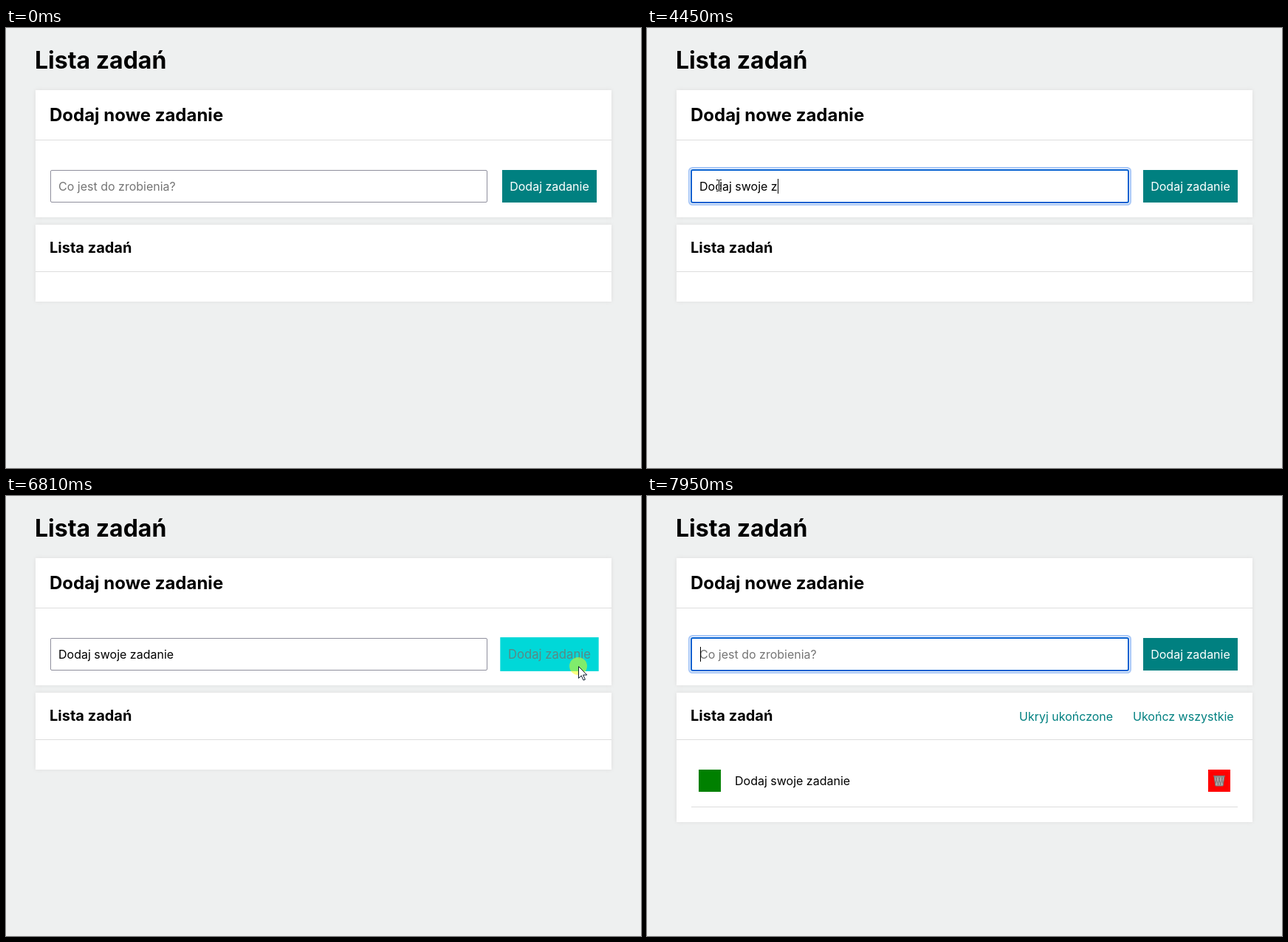
An HTML page that plays this animation: 860 by 595 pixels, repeating every 8 s.

```html
<!DOCTYPE html>
<html lang="pl">
<head>
<meta charset="utf-8">
<title>Lista zadań</title>
<style>
html, body { margin: 0; width: 100%; height: 100%; overflow: hidden; background: #eef0f0; }
body { font: 16px/20px Inter, sans-serif; font-optical-sizing: none; color: #000; }
body * { position: absolute; left: 0; top: 0; box-sizing: border-box; margin: 0; white-space: pre; }
section { left: 40px; width: 780px; background: #fff; box-shadow: 0 0 5px #ddd; }
h1 { left: 39px; top: 24px; font-size: 32px; line-height: 39px; }
h2 { width: 780px; padding-left: 19px; border-bottom: 1px solid #ddd; }
#form { top: 84px; height: 172px; }
#form h2 { font-size: 24px; line-height: 67px; height: 68px; }
#list { top: 266px; height: 104px; }
#list h2 { font-size: 20px; line-height: 63px; height: 64px; }
#field { left: 60px; top: 192px; width: 592px; height: 44px; border: 1px solid #8f8f9d; border-radius: 2px; background: #fff; }
#field.focus { border-color: #0560d0; box-shadow: 0 0 0 1px #0560d0, 0 0 0 2px #fff, 0 0 0 4px #a9c8f7; }
#text { left: 71px; top: 204px; }
#caret { top: 204px; width: 1px; height: 20px; background: #000; }
#button { left: 672px; top: 192px; width: 128px; height: 44px; line-height: 44px; text-align: center; }
.link { top: 22px; color: teal; }
.box { top: 104px; width: 30px; height: 30px; }
#line { left: 20px; top: 154px; width: 740px; height: 1px; background: #ddd; }
</style>
</head>
<body>
<h1>Lista zadań</h1>
<section id="form"><h2>Dodaj nowe zadanie</h2></section>
<section id="list">
  <h2>Lista zadań</h2>
  <div id="item">
    <span class="link" style="left:464px">Ukryj ukończone</span>
    <span class="link" style="left:618px">Ukończ wszystkie</span>
    <div class="box" style="left:30px;background:green"></div>
    <span style="left:79px;top:109px">Dodaj swoje zadanie</span>
    <div class="box" style="left:720px;background:red">
      <svg width="30" height="30" fill="none" stroke="#777">
        <path d="M8 9h14l-2 13h-10z" fill="#b5aaaa"/>
        <path d="M7 8.5h16M10 10l4 11M14 10l3 11M18 10l2 9M20 10l-4 11M16 10l-3 11M12 10l-2 9"/>
      </svg>
    </div>
    <div id="line"></div>
  </div>
</section>
<div id="field"></div>
<span id="text"></span>
<div id="caret"></div>
<div id="button">Dodaj zadanie</div>
<svg width="860" height="595">
  <g id="pointer">
    <circle id="press" r="12" fill="#ff0" opacity=".5"/>
    <path id="arrow" d="M.5.5v16l3.7-3.6 2.8 6.2 2.4-1-2.8-6.1h5.2z" fill="#fff" stroke="#0b1a2c"/>
    <g id="beam" fill="none">
      <path d="M-3-7.5h3M1-7.5h3M.5-7v14M-3 7.5h3M1 7.5h3" stroke="#fff" stroke-width="2.5"/>
      <path d="M-3-7.5h3M1-7.5h3M.5-7v14M-3 7.5h3M1 7.5h3" stroke="#000"/>
    </g>
  </g>
</svg>
<script>
const $ = id => document.getElementById(id);
const LOOP = 8000, FOCUS = 800, PRESS = 6740, ADDED = 6880;

// Bursts of typing: start time and letters, one every KEY_GAP ms.
const KEY_GAP = 82;
const bursts = [[1800, 'Do'], [2190, 'da'], [2720, 'j '], [3130, 'swo'],
  [3590, 'je '], [4450, 'z'], [4720, 'a'], [4930, 'danie']];
const keys = bursts.flatMap(([start, letters]) =>
  [...letters].map((letter, i) => ({ letter, time: start + i * KEY_GAP })));

const span = (t, a, b) => Math.min(1, Math.max(0, (t - a) / (b - a)));
const mix = (a, b, u) => a + (b - a) * u;
const show = (id, on) => $(id).style.display = on ? '' : 'none';

// Typing shows the caret, while the blink timer keeps its own beat.
function caretOn(t, pressed) {
  if (t < FOCUS || t >= PRESS && t < ADDED) return false;
  if (t >= ADDED) return Math.floor((t - ADDED) / 533) % 2 === 0;
  const beat = time => Math.floor((time - 792) / 532);
  const last = pressed.length ? pressed[pressed.length - 1].time : FOCUS;
  return (beat(t) - beat(last)) % 2 === 0;
}

function pointerAt(t) {
  if (t < 5925) {
    const u = 1 - (1 - span(t, 440, 790)) ** 2;
    return [mix(-12, 97, u), mix(352, 213, u)];
  }
  const s = span(t, 5925, 6680), u = s * s * (3 - 2 * s);
  const curve = (a, b, c) => mix(mix(a, b, u), mix(b, c, u), u);
  return [curve(97, 430, 775), curve(213, 479, 230)];
}

function drawField(t, added) {
  const pressed = added ? [] : keys.filter(k => k.time <= t);
  const typed = pressed.map(k => k.letter).join('');
  const text = $('text');
  text.textContent = typed || 'Co jest do zrobienia?';
  text.style.color = typed ? '#000' : '#757575';
  const width = typed ? text.getBoundingClientRect().width : 0;
  $('caret').style.left = 72 + Math.floor(width) + 'px';
  show('caret', caretOn(t, pressed));
  $('field').className = t >= FOCUS && t < PRESS || added ? 'focus' : '';
}

function drawButton(t) {
  const hover = span(t, 6520, 6720) - span(t, 7180, 7480);
  const active = span(t, PRESS, 6850) * (1 - span(t, 6860, 6960));
  const tone = mix(128, 191, hover) + 38 * active;
  const ink = [0, 72, 66].map(c => mix(255, c, active));
  Object.assign($('button').style, {
    transform: hover ? `scale(${1 + 0.042 * hover})` : 'none',
    background: `rgb(0,${tone},${tone})`,
    color: `rgb(${ink})`
  });
}

function drawPointer(t) {
  const [x, y] = pointerAt(t).map(Math.round);
  const inField = x >= 60 && x < 652 && y >= 192 && y < 236;
  $('pointer').setAttribute('transform', `translate(${x} ${y})`);
  $('pointer').setAttribute('opacity', 1 - span(t, 7180, 7480));
  show('pointer', t >= 470);
  show('arrow', !inField);
  show('beam', inField);
  show('press', t >= FOCUS && t < 920 || t >= PRESS && t < ADDED);
}

function draw(t) {
  const added = t >= ADDED;
  show('item', added);
  $('list').style.height = (added ? 175 : 104) + 'px';
  drawField(t, added);
  drawButton(t);
  drawPointer(t);
}

const start = performance.now();
function tick() {
  draw((performance.now() - start) % LOOP);
  requestAnimationFrame(tick);
}
tick();
</script>
</body>
</html>
```
